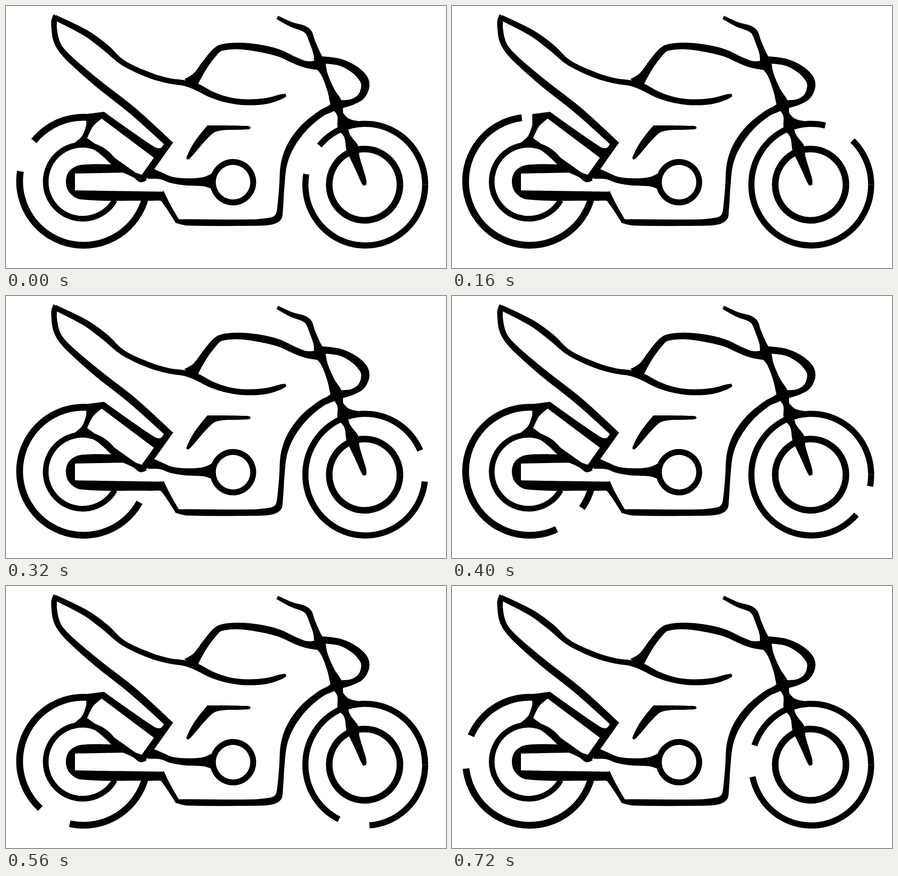
Recreate the animation shown at these times as an HTML page. Size 970 by 577 pixels, loop 800 ms.

```html
<!DOCTYPE html>
<html lang="en">
<head>
<meta charset="utf-8">
<title>Motorcycle</title>
<style>
  html, body { margin: 0; width: 100%; height: 100%; overflow: hidden; background: #fff; }
  svg { display: block; width: 970px; height: 577px; }
</style>
</head>
<body>
<svg viewBox="0 0 970 577">
  <g id="tyres"></g>
  <g id="gaps"></g>
  <g id="body"></g>
</svg>
<script>
function add(layer, attrs) {
  const path = document.createElementNS('http://www.w3.org/2000/svg', 'path');
  for (const name in attrs) path.setAttribute(name, attrs[name]);
  document.getElementById(layer).append(path);
  return path;
}

// "x,y" or "x,y,width" points; a trailing "!" marks a sharp corner.
function parse(text) {
  return text.trim().split(/\s+/).map(s => {
    const [x, y, w] = s.replace('!', '').split(',').map(Number);
    return { x, y, w, sharp: s.endsWith('!') };
  });
}

function direction(a, b) {
  const len = Math.hypot(b.x - a.x, b.y - a.y) || 1;
  return { x: (b.x - a.x) / len, y: (b.y - a.y) / len };
}

// Smooth closed curve through the points
function smooth(pts) {
  const n = pts.length;
  const dirs = pts.map((p, i) => p.sharp ? { x: 0, y: 0 } : direction(pts[(i + n - 1) % n], pts[(i + 1) % n]));
  let d = `M${pts[0].x},${pts[0].y}`;
  pts.forEach((p, i) => {
    const j = (i + 1) % n, q = pts[j], u = dirs[i], v = dirs[j];
    const h = Math.hypot(q.x - p.x, q.y - p.y) / 3;
    d += `C${p.x + u.x * h},${p.y + u.y * h} ${q.x - v.x * h},${q.y - v.y * h} ${q.x},${q.y}`;
  });
  return d + 'Z';
}

// First outline is filled, the others are holes in it.
function fill(...outlines) {
  add('body', { d: outlines.map(o => smooth(parse(o))).join(''), 'fill-rule': 'evenodd' });
}

// Pen line whose width changes along its key points
function brush(text) {
  const pts = parse(text), last = pts.length - 1;
  const side = sign => pts.map((p, i) => {
    const t = direction(pts[Math.max(i - 1, 0)], pts[Math.min(i + 1, last)]);
    const r = sign * p.w / 2;
    return { x: p.x - t.y * r, y: p.y + t.x * r, sharp: i === 0 || i === last };
  });
  add('body', { d: smooth([...side(1), ...side(-1).reverse()]) });
}

// Elliptic arc, clockwise between two angles in degrees
function arc({ x, y, rx, ry = rx }, from, to) {
  const at = deg => {
    const a = deg * Math.PI / 180;
    return `${x + rx * Math.cos(a)},${y + ry * Math.sin(a)}`;
  };
  return `M${at(from)}A${rx},${ry} 0 ${to - from > 180 ? 1 : 0} 1 ${at(to)}`;
}

function ring(layer, shape, width, from = 0, to = 359.9, color = '#000') {
  return add(layer, { d: arc(shape, from, to), fill: 'none', stroke: color, 'stroke-width': width });
}

// Middle of the tyre gap at each step, in degrees
const STEP = 80, HALF_GAP = 15;
const rear = { x: 171, y: 386, rx: 141, mids: [204, 242, 278, 340, 14, 50, 88, 117.5, 154, 188.5] };
const front = { x: 792, y: 393.5, rx: 132, ry: 134, mids: [205, 251, 298.5, 327, -8.5, 26, 66.5, 101, 142, 183.5] };
const wheels = [rear, front];

ring('tyres', rear, 15, 14, 273);
ring('tyres', front, 13.5);
for (const w of wheels) w.gap = ring('gaps', w, 26, 0, 1, '#fff');

// Hubs and engine
ring('body', { x: 169, y: 387, rx: 81.5 }, 12.5, 30, 330);
ring('body', { x: 790.5, y: 393.5, rx: 78, ry: 78.5 }, 14.5);
ring('body', { x: 500.5, y: 388, rx: 44.5 }, 13);

// Tail and rail
brush('106,19,3 106,32,12 106,47,12 110,73,13 120,94,12.5 143,119,14 200,168.5,16 280,231.5,17 363,307,16');
// Seat and lower tank line
brush(`107,25,12 175,59,14 219,91,15 258,125,12 318,153,12.5 360,165,12 395,170,13 422,179,15
  453,195,14 490,207,13 530,212,13 575,209,13 606,200,11 617,196,6`);
// Tank
brush(`406,172,34 421,155,20 440,127,16 461,101,15 474,92,14 510,88,14.5 555,92.5,16 600,103,16
  640,121,15 663,129,15 690,130,22`);
// Handlebar and fork
brush(`598,25,8 630,41,11 655,49,13 667,58,14 675,78,13 685,104,15 692,127,24 702,150,14 716,185,15.5
  729,216,26 737,240,14 742,266,22 752,286,14 764,314,28 769,333,21 780,362,16 788,384,13 791,395,7`);
// Headlight
brush('697,119,16 735,123.5,15 767,139,17 788,160,19 792,177,18 783,199,15 764,211,13 742,216,17 728,217,18');
// Front fairing and belly
brush(`728,217,22 716,226,16 695,236.5,14.5 657,268,16 628,307.5,16 613,347,14 608,398,11.5 604,448,13
  600,465,16 585,473.5,16 540,477,14 400,476.5,14 376,474,8`);
brush('379,476,10 357,440,12 340,412,18');
// Mudguard joint
brush('738,243,18 753,254,13 775,259,12');
// Pipe
brush('315,368,26 343,374.5,15 365,383,14 400,387.5,16 435,387,20 456,386,36');

// Swingarm
fill(`310,384! 296,388 280,377 258,367! 152,369! 152,406! 348,409! 352,434! 340,429 318,429
  165,426 140,411 132,387 140,363 165,350 235,349! 300,372!`);
// Shock absorber
fill(`177,238! 216,233! 325,309 340,313 349,302! 369,300! 330,355! 305,387! 232,349!
  195,317 165,311! 150,302! 168,286 177,262!`,
  '211,248! 326,334! 297,375! 179,291! 192,265');
// Side duct
fill('444,263! 525,264 539,268 525,272 465,276 441,295 408,333 400,338 398,333 415,300');

function draw(ms) {
  const i = Math.floor(ms / STEP) % rear.mids.length;
  for (const w of wheels) {
    w.gap.setAttribute('d', arc(w, w.mids[i] - HALF_GAP, w.mids[i] + HALF_GAP));
  }
}

function tick() {
  draw(performance.now());
  requestAnimationFrame(tick);
}
draw(0);
requestAnimationFrame(tick);
</script>
</body>
</html>
```
